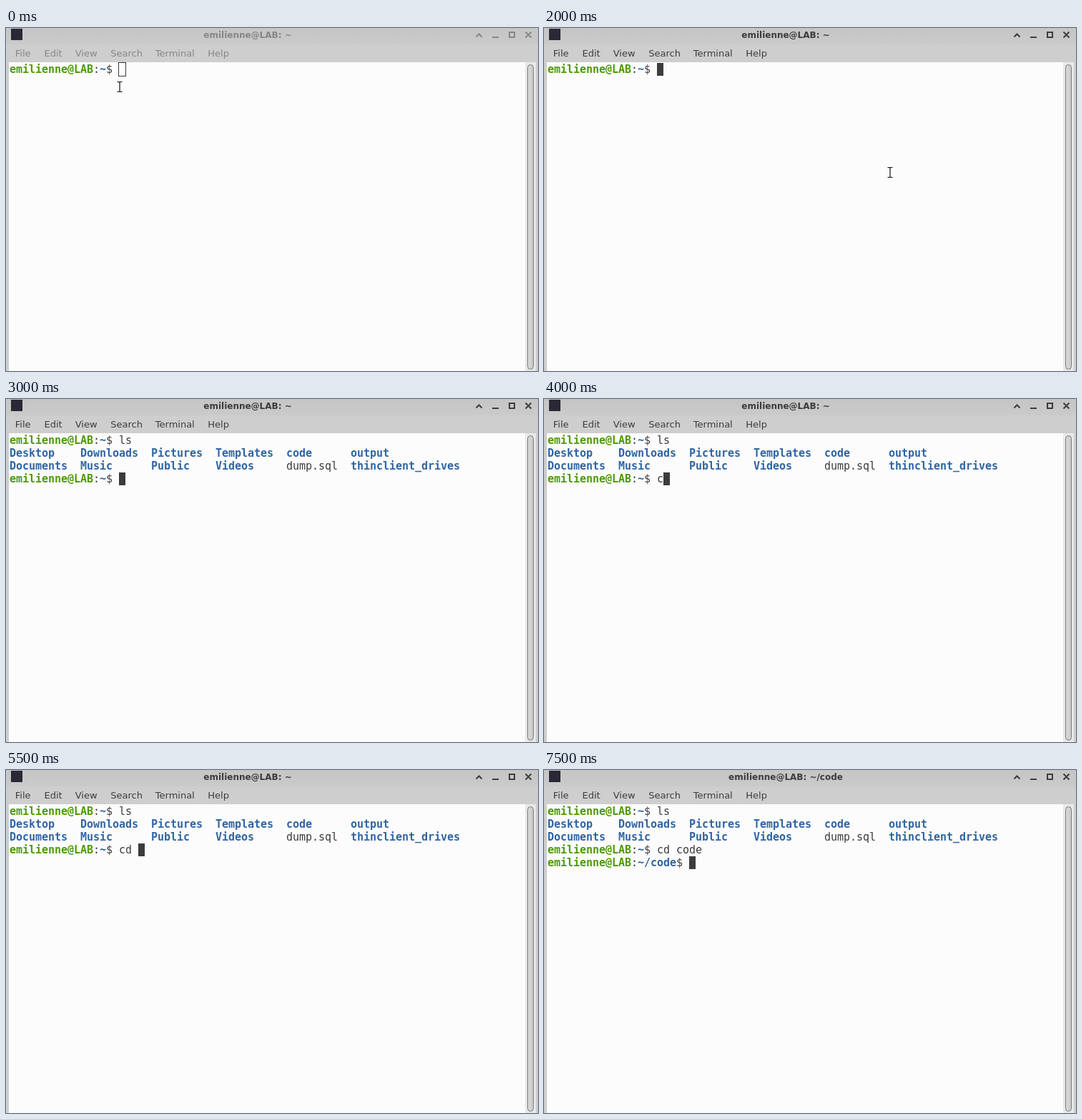
An HTML page for the animation above (8000 ms loop, 744 by 481 pixels).

```html
<!DOCTYPE html>
<html lang="en">
<head>
<meta charset="utf-8">
<title>Terminal</title>
<style>
  html, body { margin: 0; height: 100%; overflow: hidden; background: #cecece; }
  svg { display: block; --ink: #3c3c3c; }
  svg.idle { --ink: #868686; }
  text { white-space: pre; }
  #title { font: bold 12px "DejaVu Sans", sans-serif; text-anchor: middle; fill: var(--ink); }
  #menu { font: 13px "DejaVu Sans", sans-serif; fill: var(--ink); }
  #buttons { fill: none; stroke: var(--ink); stroke-width: 2; }
  #screen { font: 15px "DejaVu Sans Mono", monospace; letter-spacing: -.031px; fill: #3c3c3c; }
  .user { font-weight: bold; fill: #4e9a06; }
  .dir { font-weight: bold; fill: #3065a4; }
</style>
</head>
<body>
<svg id="stage" width="744" height="481" viewBox="0 0 744 481">
  <defs>
    <linearGradient id="bar" x2="0" y2="1">
      <stop stop-color="#c5c5c5"/><stop offset="1" stop-color="#cacaca"/>
    </linearGradient>
    <linearGradient id="thumb">
      <stop stop-color="#dadada"/><stop offset="1" stop-color="#cacaca"/>
    </linearGradient>
  </defs>
  <rect width="744" height="481" fill="#cecece"/>
  <rect width="744" height="23" fill="url(#bar)"/>
  <rect x="7" y="1" width="16" height="16" fill="#282836"/>
  <text id="title" x="338" y="14"></text>
  <g id="buttons">
    <path d="M657.5 12.5l4-4 4 4M680 13h9M704 6h7v7h-7zM726.5 5.5l8 8m0-8l-8 8"/>
  </g>
  <g id="menu"></g>
  <rect x="4" y="48" width="722" height="433" fill="#fcfcfc"/>
  <rect x="726" y="48" width="15" height="433" fill="#e8e8e8"/>
  <rect x="729.5" y="51.5" width="8" height="427" rx="4" fill="url(#thumb)" stroke="#7c7c7c"/>
  <g id="screen"></g>
  <rect id="cursor" stroke="#3c3c3c"/>
  <path id="pointer" d="M155.5 75.5h2.5l1 1 1-1h2.500M159 76v13M155.500 89.500h2.500l1-1 1 1h2.500" fill="none" stroke="#111" stroke-width="1.200"/>
</svg>
<script>
const $ = id => document.getElementById(id);
const STEP = 500, STEPS = 16, CELL = 9, ROW = 18;
const HOST = "emilienne@LAB";

// Pointer offsets per step while it is visible
const pointerPath = [[0, 0], [6, -7], [29, -14], [232, 70], [325, 120]];
const typedByStep = { 8: "c", 9: "cd", 10: "cd", 11: "cd ", 12: "cd co" };
const listing = [
  ["Desktop", "Downloads", "Pictures", "Templates", "code", "output"],
  ["Documents", "Music", "Public", "Videos", "dump.sql", "thinclient_drives"]
];
const columns = [0, 11, 22, 32, 43, 53];

const word = (col, row, str, cls = "") =>
  `<text class="${cls}" x="${5 + col * CELL}" y="${63 + row * ROW}">${str}</text>`;

function prompt(row, path, typed) {
  const end = HOST.length + 1 + path.length;
  return word(0, row, HOST, "user") + word(HOST.length, row, ":") +
    word(HOST.length + 1, row, path, "dir") + word(end, row, "$ " + typed);
}

function setCursor(col, row, hollow, visible) {
  const grow = hollow ? .5 : 0;
  const attrs = {
    x: 5 + col * CELL - grow, y: 49 + row * ROW - grow,
    width: CELL + 2 * grow, height: ROW + 2 * grow,
    fill: hollow ? "none" : "#3c3c3c", "stroke-width": hollow ? 1 : 0,
    visibility: visible ? "visible" : "hidden"
  };
  for (const key in attrs) $("cursor").setAttribute(key, attrs[key]);
}

function draw(step) {
  const idle = step < 2, listed = step >= 6, moved = step >= 15;
  const path = moved ? "~/code" : "~";
  const first = step < 5 ? "" : "ls";
  const second = step < 8 ? "" : typedByStep[step] || "cd code";

  let html = prompt(0, "~", first);
  if (listed) {
    listing.forEach((names, r) => names.forEach((name, i) => {
      html += word(columns[i], r + 1, name, name.includes(".") ? "" : "dir");
    }));
    html += prompt(3, "~", second);
  }
  if (moved) html += prompt(4, path, "");
  $("screen").innerHTML = html;

  $("title").textContent = `${HOST}: ${path}`;
  $("stage").classList.toggle("idle", idle);

  const typed = moved ? "" : listed ? second : first;
  const col = HOST.length + 3 + path.length + typed.length;
  setCursor(col, moved ? 4 : listed ? 3 : 0, idle, step !== 3 && step !== 7);

  const spot = pointerPath[step];
  $("pointer").setAttribute("visibility", spot ? "visible" : "hidden");
  if (spot) $("pointer").setAttribute("transform", `translate(${spot})`);
}

$("menu").innerHTML = [["File", 12.8], ["Edit", 53.5], ["View", 96.7],
  ["Search", 146.3], ["Terminal", 208.8], ["Help", 282.3]]
  .map(([label, x]) => `<text x="${x}" y="40">${label}</text>`).join("");

let shown = -1;
const start = performance.now();
function tick(now) {
  const step = Math.floor(Math.max(0, now - start) / STEP) % STEPS;
  if (step !== shown) draw(shown = step);
  requestAnimationFrame(tick);
}
tick(start);
</script>
</body>
</html>
```
